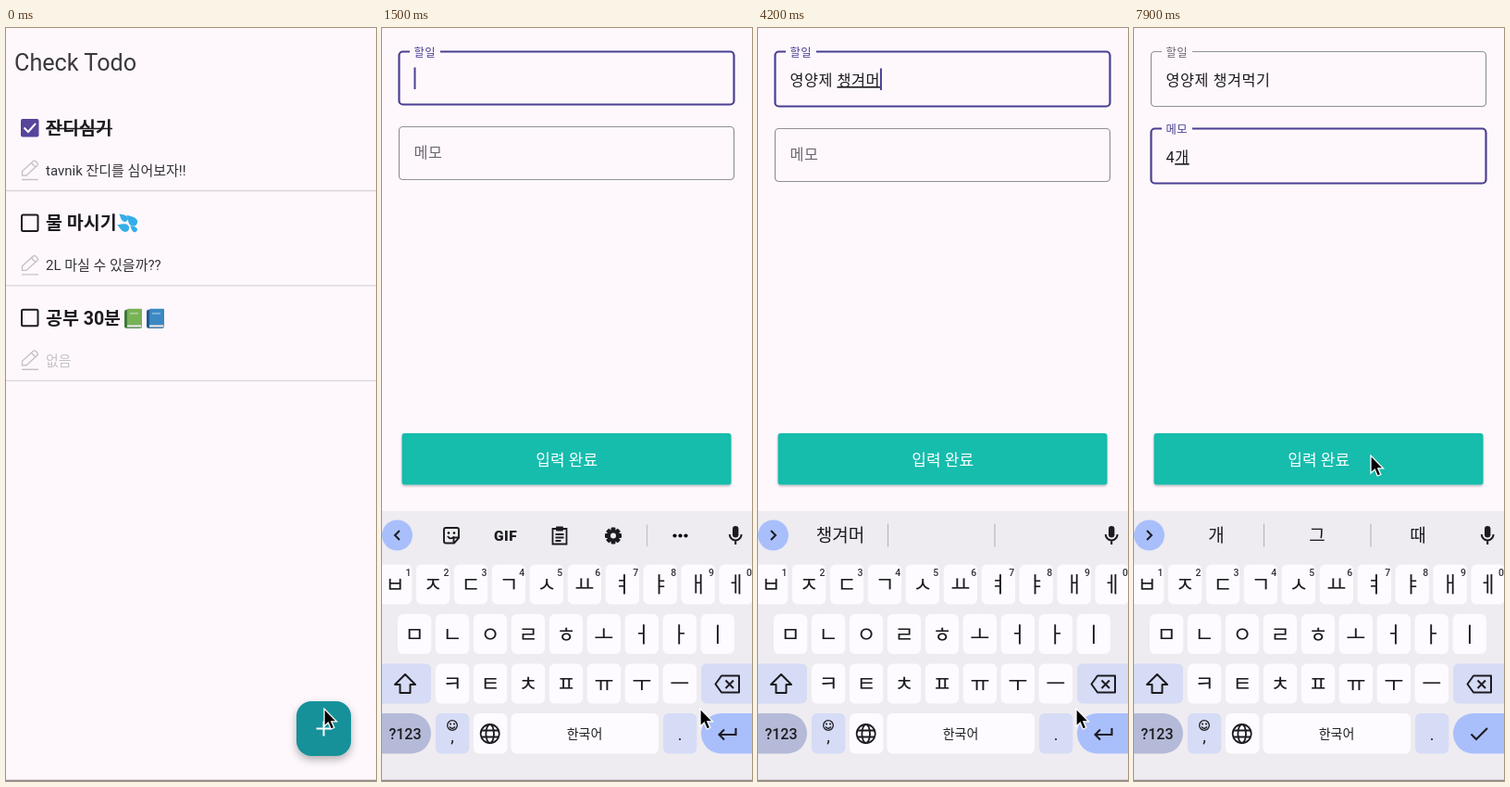
An HTML page that plays this animation: 400x812 px, repeating every 8 s.

```html
<!DOCTYPE html>
<html lang="ko">
<head>
<meta charset="utf-8">
<style>
html, body { margin: 0; height: 100%; overflow: hidden; background: #fef8fd }
svg { display: block; width: 100%; height: 100% }
text { font-family: Roboto, "Noto Sans CJK KR", "Noto Sans CJK", sans-serif; white-space: pre }
</style>
</head>
<body>
<svg id="stage" viewBox="0 0 400 812"></svg>
<script>
const BG = '#fef8fd', INK = '#1c1b20', PURPLE = '#4b3f92', GREY = '#c6c2c7', TEAL = '#17bcac';
const stage = document.getElementById('stage');
const clamp = v => Math.max(0, Math.min(1, v));
const ease = v => { v = clamp(v); return v * v * (3 - 2 * v); };

const text = (s, x, y, size, fill = INK, extra = '') =>
  `<text x="${x}" y="${y}" font-size="${size}" fill="${fill}" ${extra}>${s}</text>`;
const mid = (s, x, y, size, fill, extra = '') => text(s, x, y, size, fill, 'text-anchor="middle" ' + extra);
const box = (x, y, w, h, r, fill, extra = '') =>
  `<rect x="${x}" y="${y}" width="${w}" height="${h}" rx="${r}" fill="${fill}" ${extra}/>`;
const line = (d, stroke = INK, w = 2, extra = '') =>
  `<path d="${d}" fill="none" stroke="${stroke}" stroke-width="${w}" ${extra}/>`;
const at = (x, y, inner, extra = '') => `<g transform="translate(${x} ${y})" ${extra}>${inner}</g>`;

// ---- list screen ----
const pencil = line('M1.5 16.5V12.5L13.5 1.5Q15 .5 16.5 2L18 3.7Q19 5 17.8 6.3L6 17H1.5ZM11.5 3.5L15.8 8M1 21.5H19', GREY, 1.4);

function item(i, title, memo, memoFill, decor, done) {
  const check = done
    ? box(16, 98, 19.5, 19.5, 2, '#57449b') + line('M19.5 107.5L24 112L32 103', '#fff', 2)
    : box(17, 99, 17.5, 17.5, 1.5, 'none', `stroke="${INK}" stroke-width="2"`);
  return at(0, i * 102.4, check + text(title, 43, 115, 19.5, INK, 'font-weight="700"') + decor +
    at(16, 142, pencil) + text(memo, 43, 159, 15, memoFill) + line('M0 175.5H400', '#dad5da', 1.3));
}

const drop = (x, y, s, a) =>
  `<path transform="translate(${x} ${y}) rotate(${a}) scale(${s})" d="M0 -7C2 -3 4 -1 4 2A4 4 0 0 1 -4 2C-4 -1 -2 -3 0 -7Z" fill="#35aee8"/>`;
const drops = drop(127, 102, .85, -50) + drop(136, 105, 1.15, -42) + drop(127, 112.5, 1.05, -68) + drop(138, 114, .7, -50);
const book = (x, dark, main) => box(x, 99, 19, 20, 2, dark) + box(x + 3, 98, 16, 17.5, 1, main) +
  box(x + 3, 115.5, 15.5, 2.2, 0, '#eee') + box(x + 6, 102, 9, 2, 0, '#fff', 'opacity=".35"');

const list = text('Check Todo', 9, 46, 25.2, '#3b393f') +
  item(0, '잔디심기', 'tavnik 잔디를 심어보자!!', '#343238', line('M43 108.5H115', INK, 1.4), true) +
  item(1, '물 마시기', '2L 마실 수 있을까??', '#343238', drops) +
  item(2, '공부 30분', '없음', GREY, book(128, '#3d7a35', '#77b255') + book(152, '#1f5a94', '#3b88c3')) +
  box(314, 726, 59, 59, 16, '#15919a', 'filter="url(#lift)"') + line('M335.5 755.5H351.5M343.5 747.5V763.5', '#fff', 2);

// ---- keyboard ----
const KEY = '#fdfbff', SOFT = '#d6dcf5', BLUE = '#a9bffc';
const jamo = (c, x, y) => box(x, y, 36.3, 43, 6, KEY) + mid(c, x + 18.2, y + 29.5, 23, INK);
const row = (s, x0, y) => [...s].map((c, i) => jamo(c, x0 + 40.95 * i, y)).join('');
const digits = [...'1234567890'].map((c, i) => mid(c, 28.5 + 40.95 * i, 591, 10.5, '#33323a', 'font-weight="500"')).join('');
const mic = box(379, 537, 6.4, 12.5, 3.2, INK) + line('M375.8 546A6.4 6.4 0 0 0 388.6 546M382.2 552.5V557', INK, 2);
const globe = `<g fill="none" stroke="${INK}" stroke-width="1.8"><circle cx="116.7" cy="761" r="10"/>` +
  `<ellipse cx="116.7" cy="761" rx="4.3" ry="10"/><path d="M107.5 757.5H126M107.5 764.5H126"/></g>`;
const smiley = `<circle cx="76" cy="752" r="5.3" fill="none" stroke="${INK}" stroke-width="1.3"/>` +
  line('M73 753.5Q76 757 79 753.5', INK, 1.3) + `<circle cx="74" cy="750.5" r=".9"/><circle cx="78" cy="750.5" r=".9"/>`;
const keys = box(0, 521, 400, 300, 0, '#eeecf1') + mic +
  row('ㅂㅈㄷㄱㅅㅛㅕㅑㅐㅔ', -4, 578.5) + digits + row('ㅁㄴㅇㄹㅎㅗㅓㅏㅣ', 17, 632) + row('ㅋㅌㅊㅍㅠㅜㅡ', 58, 685.5) +
  box(-20, 685.5, 73, 43, 6, SOFT) + line('M25 697L36 708H30.5V717H19.5V708H14Z', INK, 2, 'stroke-linejoin="round"') +
  box(345, 685.5, 80, 43, 6, SOFT) +
  line('M367 698.5H386V716.5H367L360.5 707.5ZM371.5 703.5L380 712M380 703.5L371.5 712', INK, 2, 'stroke-linejoin="round"') +
  box(-24, 739, 77, 43.5, 21.7, '#b4bad7') + mid('?123', 25, 766.5, 16, INK, 'font-weight="500"') +
  box(58, 739, 36.3, 43.5, 6, SOFT) + smiley + mid(',', 76, 770, 18, INK) +
  box(99, 739, 36.3, 43.5, 6, KEY) + globe +
  box(139.5, 739, 159.5, 43.5, 6, KEY) + mid('한국어', 219, 766, 14, INK) +
  box(304, 739, 36.3, 43.5, 6, SOFT) + mid('.', 322, 768, 18, INK) + box(345, 739, 77, 43.5, 21.7, BLUE);

const teeth = [0, 45, 90, 135].map(a => `<rect x="-2.4" y="-9" width="4.8" height="18" rx="1" transform="rotate(${a})"/>`).join('');
const tools =
  line('M69 539H81Q83 539 83 541V550L78 555.5H69Q67 555.5 67 553.5V541Q67 539 69 539ZM83 549.5H77.5V555.5M71 548Q74 552.5 78 548.5', INK, 1.9) +
  '<circle cx="72" cy="544.5" r="1.3"/><circle cx="78" cy="544.5" r="1.3"/>' +
  mid('GIF', 133.5, 552.7, 15.5, INK, 'font-weight="900" letter-spacing=".5"') +
  line('M184.5 540H199.5V556.5H184.5ZM187.5 546H196.5M187.5 549.5H196.5M187.5 553H193.5', INK, 1.8) + box(188, 537.5, 8, 5, 1, INK) +
  at(250, 547.5, teeth + `<circle r="6.6"/><circle r="3" fill="#eeecf1"/>`, `fill="${INK}"`) +
  line('M286.5 535.5V559', '#c3c1c8', 1.2) +
  [316.5, 322.5, 328.5].map(x => `<circle cx="${x}" cy="547.5" r="2.1"/>`).join('');

function strip(words) {
  const chevron = `<circle cx="16.5" cy="547" r="16.5" fill="${BLUE}"/>` +
    line(words ? 'M14 542L19 547L14 552' : 'M19 542L14 547L19 552');
  return chevron + (words
    ? words.map((w, i) => mid(w, 89 + 109 * i, 554, 19, INK)).join('') + line('M140.5 534.5V559.5M256 534.5V559.5', '#b9b7bf', 1.2)
    : tools);
}

// ---- typing ----
const typed = (field, start, step, done, parts) =>
  parts.split(' ').map((p, i) => ({ t: start + i * step, field, done, part: p }));
const strokes = [
  ...typed(0, 2000, 150, '', 'ㅇ 여 영 영ㅇ 영야 영양 영양ㅈ 영양제'),
  { t: 3250, field: 0, done: '영양제 ', part: '' },
  ...typed(0, 3450, 125, '영양제 ', 'ㅊ 채 챙 챙ㄱ 챙겨 챙겨ㅁ 챙겨머 챙겨먹 챙겨먹ㄱ 챙겨먹기'),
  { t: 6900, field: 1, done: '4', part: '' },
  ...typed(1, 7100, 200, '4', 'ㄱ 개')
];
const hints = {
  '영': ['영상', '영화'], '영양': ['영양제', '영양소'], '영양제': ['영양제는', '영양제를'],
  '챙겨': ['챙겨서', '챙겨야'], '챙겨먹기': ['챙겨먹고', ''], '개': ['그', '때']
};
const suggest = s => s.part ? [s.part, ...(hints[s.part] || ['', ''])] : s.field ? ['개', '월', '시'] : ['중', '먹방', '등'];

// ---- form ----
const FADE = 100, FOCUS = 500, MEMO = 6000;

function field(y, label, lift, focus, s, caret) {
  const tall = s && s.done + s.part !== '4';
  const size = 16.3 - 4 * lift, color = focus ? PURPLE : '#69666d';
  const value = s ? s.done + (focus ? `<tspan text-decoration="underline">${s.part}</tspan>` : s.part) : '';
  return box(18.5, y, 362, tall ? 59 : 57, 4, 'none', `stroke="${focus ? PURPLE : '#929097'}" stroke-width="${focus ? 2.2 : 1.2}"`) +
    (lift > .3 ? box(30, y - 2, 33, 4, 0, BG) : '') +
    text(label, 34.5, y + 33.5 - 28.5 * lift, size, color, 'letter-spacing=".4"') +
    text(value, 34.5, y + 36.5, 16.3, INK, 'letter-spacing=".5"' + (focus ? ' id="value"' : '')) +
    (caret ? box(34.5, y + (s ? 18 : 17), 2, 23.5, 0, PURPLE, 'id="caret"') : '');
}

function form(t, rise) {
  const last = f => strokes.filter(s => s.field === f && s.t <= t).pop();
  const todo = last(0), memo = last(1), onMemo = t >= MEMO;
  const active = onMemo ? memo : todo;
  const since = t - (active ? active.t : onMemo ? MEMO : FOCUS);
  const caret = since >= 0 && since % 1000 < 500;
  const memoLift = ease((t - MEMO + 50) / 150);
  const screen = field(25.5, '할일', 1, !onMemo, todo, caret && !onMemo) +
    field(todo ? 108.5 : 106.5, '메모', memoLift, onMemo, memo, caret && onMemo) +
    at(0, -295 * rise, box(21.5, 732, 356, 55.5, 3, TEAL, 'filter="url(#low)"') + mid('입력 완료', 199.7, 767.2, 17, '#fff'));
  const enter = onMemo ? 'M364.5 761.5L370 767L382 755' : 'M382.5 755V762H364.5M370 756.5L364.5 762L370 767.5';
  const board = rise > 0 ? at(0, 295 * (1 - rise), keys + strip(active && suggest(active)) + line(enter, INK, 2.1)) : '';
  return { screen, board };
}

// ---- pointer: time, x, y ----
const path = [[0, 344, 734], [4700, 344, 734], [5200, 348, 276], [5800, 294, 145], [7300, 294, 145], [7900, 256, 461]];
function pointer(t) {
  const i = Math.max(1, path.findIndex(p => p[0] >= t));
  const [a, b] = [path[i - 1], path[i]], k = ease((t - a[0]) / (b[0] - a[0]));
  return at(a[1] + (b[1] - a[1]) * k, a[2] + (b[2] - a[2]) * k,
    '<path d="M0 0V19L4.3 15L7.2 22L10.8 20.5L7.8 13.8H13.5Z" fill="#000" stroke="#fff" stroke-width="1.3"/>');
}

const defs = `<defs><filter id="lift" x="-30%" y="-30%" width="160%" height="170%"><feDropShadow dx="0" dy="4" stdDeviation="4" flood-opacity=".3"/></filter>
<filter id="low" x="-5%" y="-20%" width="110%" height="150%"><feDropShadow dx="0" dy="1.5" stdDeviation="1.2" flood-opacity=".28"/></filter></defs>`;

function draw(t) {
  const fade = ease((t - FADE) / 700);
  const rise = 1 - (1 - clamp((t - 850) / 400)) ** 3;
  const { screen, board } = form(t, rise);
  stage.innerHTML = defs + (fade < 1 ? `<g opacity="${1 - fade}">${list}</g>` : '') +
    `<g opacity="${fade}">${screen}</g>` + board + line('M0 811.3H400', '#8b888d', 1.2) + pointer(t);
  const caret = document.getElementById('caret');
  if (caret) caret.setAttribute('x', 34.5 + document.getElementById('value').getComputedTextLength());
}

let shown = -1;
function tick() {
  const t = Math.floor(performance.now() % 8000 / 100) * 100;
  if (t !== shown) draw(shown = t);
  requestAnimationFrame(tick);
}
tick();
</script>
</body>
</html>
```
